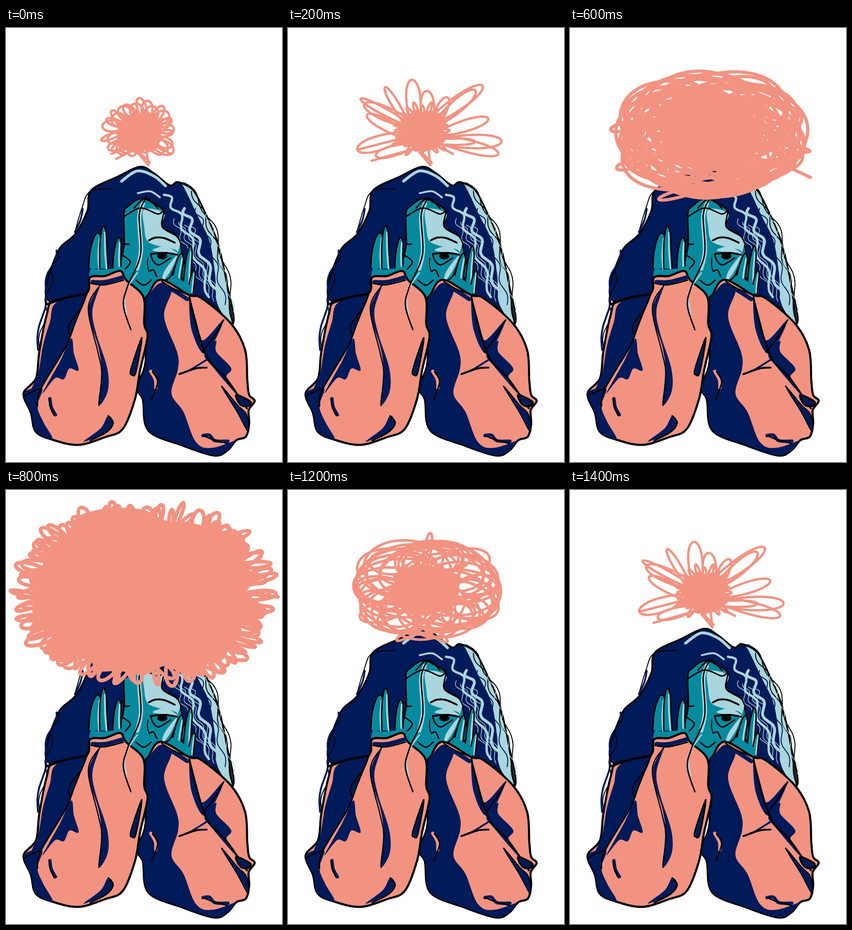
These frames come from a looping animation (597 px wide and 938 px high, 1600 ms). An HTML page:

```html
<!DOCTYPE html>
<html lang="en">
<head>
<meta charset="utf-8">
<title>Tangled thoughts</title>
<style>
html, body { margin: 0; width: 100%; height: 100%; overflow: hidden; background: #fff; }
svg { display: block; width: 100%; height: 100%; }
</style>
</head>
<body>
<svg id="stage" viewBox="0 0 597 938" stroke-linecap="round" stroke-linejoin="round"></svg>
<script>
const NAVY = '#001a5a', TEAL = '#078a9e', PALE = '#a9d6de', CORAL = '#f29382', INK = '#000';
const TAU = Math.PI * 2;
const stage = document.getElementById('stage');

function make(tag, attrs, parent = stage) {
  const node = document.createElementNS('http://www.w3.org/2000/svg', tag);
  for (const key in attrs) node.setAttribute(key, attrs[key]);
  return parent.appendChild(node);
}

function seeded(seed) {
  return () => (seed = seed * 16807 % 2147483647) / 2147483647;
}

const parse = text => text.trim().split(/\s+/).map(p => p.split(',').map(Number));

// Smooth curve through a list of [x, y] points.
function curve(pts, closed) {
  const n = pts.length;
  const at = i => closed ? pts[(i + n) % n] : pts[Math.max(0, Math.min(n - 1, i))];
  let d = 'M' + pts[0];
  for (let i = 0; i < (closed ? n : n - 1); i++) {
    const [a, b, c, e] = [at(i - 1), at(i), at(i + 1), at(i + 2)];
    const p = b.map((v, k) => (v + (c[k] - a[k]) / 6).toFixed(1));
    const q = c.map((v, k) => (v - (e[k] - b[k]) / 6).toFixed(1));
    d += `C${p} ${q} ${c}`;
  }
  return d + (closed ? 'Z' : '');
}

function shape(text, fill, width = 0) {
  make('path', { d: curve(parse(text), true), fill, stroke: INK, 'stroke-width': width });
}
function stroke(pts, color, width) {
  make('path', { d: curve(pts), fill: 'none', stroke: color, 'stroke-width': width });
}
function line(text, color = INK, width = 3) {
  stroke(parse(text), color, width);
}

// Wavy lock of hair along a bend given by start, pull and end.
function lock(text, color, width, amp = 5, turns = 4, phase = 0) {
  const [a, m, b] = parse(text), pts = [], steps = turns * 6;
  const len = Math.hypot(b[0] - a[0], b[1] - a[1]);
  const side = [(a[1] - b[1]) / len, (b[0] - a[0]) / len];
  for (let i = 0; i <= steps; i++) {
    const t = i / steps, sway = amp * Math.sin(t * turns * TAU + phase);
    pts.push([0, 1].map(k =>
      (1 - t) ** 2 * a[k] + 2 * t * (1 - t) * m[k] + t * t * b[k] + side[k] * sway));
  }
  stroke(pts, color, width);
}

// Tapered finger with a pale edge on its right.
function finger(text, width) {
  const [base, tip] = parse(text);
  const u = [tip[0] - base[0], tip[1] - base[1]], len = Math.hypot(...u);
  const at = (t, s) => [base[0] + u[0] * t - u[1] / len * s * width, base[1] + u[1] * t + u[0] / len * s * width];
  const edge = [at(0, -1), at(0.45, -1), at(0.85, -0.6), at(1, 0), at(0.85, 0.6), at(0.45, 0.8), at(0, 1)];
  make('path', { d: curve(edge), fill: TEAL });
  stroke([at(0.85, 0.3), at(0.4, 0.3), at(0, 0.6)], PALE, 3.5);
  stroke(edge, INK, 3);
}

function drawHair() {
  shape(`290,300 240,322 184,351 176,395 150,445 111,486 90,586 200,600 420,590 490,640
    476,545 457,462 430,398 404,350 372,333 354,340 320,314`, NAVY, 4);
  shape('372,334 404,352 430,400 457,464 476,545 490,636 458,598 452,530 440,460 414,405 384,343', PALE);
  line('372,333 404,350 430,398 457,462 476,545 490,638');

  line('250,331 284,309 320,320 345,341', PALE, 6);
  line('285,357 312,353 333,366', PALE, 4);
  lock('345,359 386,410 442,580', PALE, 5, 7, 4, 2.6);
  lock('386,390 410,450 468,600', PALE, 6, 7, 4);
  for (let i = 0; i < 4; i++) {
    lock(`${364 + i * 13},${412 + i * 6} ${388 + i * 10},480 ${430 + i * 12},${565 + i * 12}`, PALE, 1.5, 5, 4, i);
  }
  lock('410,390 442,450 474,598', NAVY, 2, 5, 4);

  line('231,347 182,353 164,390 149,441', INK, 2);
  line('166,391 161,415 149,441', NAVY, 4);
  lock('110,481 84,540 70,696', NAVY, 4, 5, 2, 3);
  lock('112,484 94,540 73,690', INK, 2, 5, 3, 3);

  lock('386,334 478,430 491,637', INK, 2, 6, 3, 3);
  lock('401,353 452,440 478,560', INK, 2, 5, 3);
  lock('434,398 462,480 492,614', PALE, 1.5, 5, 4);
}

function drawFace() {
  shape(`255,402 265,385 296,369 341,395 338,429 370,450 381,490 383,540 300,590 250,530 256,465`, TEAL, 3);
  shape('299,392 342,400 337,430 369,451 377,466 364,504 369,481 326,470 305,459 299,430', PALE);
  shape('370,491 357,523 338,548 343,525', PALE);
  shape('317,480 345,472 371,488 340,485', PALE);
  line('296,380 288,410 292,480 284,520', PALE, 9);
  line('255,408 291,389 328,402 341,397 338,430 369,450 379,468');
  line('277,389 303,367 329,390');
  line('311,375 339,390 342,400');

  line('309,459 323,453 342,454 365,464', INK, 4);
  line('314,488 345,486 370,490', INK, 4);
  make('ellipse', { cx: 338, cy: 493, rx: 11, ry: 7, fill: INK });
  line('313,489 318,503 331,512 356,497');
  line('307,497 306,511 309,524', INK, 2);
  line('310,526 319,523 326,537');
  line('281,545 298,556 314,545');
  line('253,457 258,467 267,467');
  line('250,490 269,505 258,521');
}

function drawHands() {
  finger('193,520 199,443', 14);
  finger('212,520 211,428', 9);
  finger('240,520 244,453', 9);
  shape('184,520 200,522 232,520 250,516 257,532 225,550 184,545', TEAL);

  finger('367,560 380,487', 10);
  finger('391,560 399,471', 8);
  finger('399,572 407,523', 6);
  shape('338,552 359,535 384,548 400,560 394,581 365,575', TEAL);
  line('338,550 355,538 364,518');
}

function drawRightSleeve() {
  shape(`335,544 396,577 423,584 486,638 517,695 522,762 526,793 538,806 525,826 526,855 519,883 498,891
    479,913 450,924 381,902 308,870 296,803 283,777 302,720 300,600 309,575`, CORAL, 4.5);
  shape(`334,551 358,567 342,624 370,700 372,737 358,790 384,830 411,895 448,907 519,882 498,892 479,912
    450,923 381,901 309,869 297,803 284,777 303,720 301,600 311,575`, NAVY);
  line('342,556 364,568 392,586', NAVY, 9);
  line('337,548 364,564 396,577');

  shape('397,582 412,635 426,675 471,630 432,704 402,654', NAVY);
  shape('429,705 454,676 455,700 487,735 477,755 498,791 446,731', NAVY);
  line('397,580 402,605 433,708 476,757 521,822', INK, 4);
  line('471,631 448,670 424,700');
  line('378,747 400,738 434,717', NAVY, 4);
  line('375,748 410,736 434,734', INK, 4);
  shape('466,774 501,815 520,835 524,873 500,830', NAVY, 2);
  shape('498,793 528,807 524,817 507,814', NAVY, 4);
  line('313,742 323,760 324,778', CORAL, 7);
  line('317,743 328,765 315,802');
  line('426,881 440,880 452,892 480,893', NAVY, 7);
  line('427,881 446,889 479,898');
}

function drawLeftSleeve() {
  shape(`182,539 214,536 247,525 260,545 297,581 299,640 306,668 290,740 279,802 253,866 215,884 156,901
    98,889 64,872 54,832 38,790 65,757 72,700 88,620 103,590 173,574`, CORAL, 4.5);
  shape('108,594 172,577 148,638 129,688 75,778 55,783 70,745 80,686 95,635', NAVY);
  shape('39,789 78,779 68,817 80,850 101,889 64,870 55,832', NAVY);
  shape('141,671 147,704 157,740 137,736 125,759 106,757 79,789 117,720', NAVY);
  line('181,560 149,639 130,688 75,781 68,818');
  line('88,597 133,582 174,575', INK, 5);
  line('137,661 137,640 164,604', INK, 2.5);
  line('40,795 57,786 75,779');

  line('187,549 214,549 252,539', NAVY, 9);
  line('184,552 213,555 254,545');
  shape('204,555 180,600 184,640 200,690 207,744 200,815 220,785 219,735 195,660 187,610', NAVY);
  line('204,555 178,605 199,701 207,744 201,816', INK, 2.5);
  shape('294,669 270,738 273,750 281,743', NAVY, 3);
  line('95,801 98,820 107,836', NAVY, 7);
  line('93,801 96,820 104,837');
  shape('221,838 232,853 218,873 168,894 205,865', NAVY);
  line('221,838 232,853 218,873 182,892');
}

function drawLooseStrand() {
  line('284,529 257,573 261,618', PALE, 3);
  line('300,372 288,405 291,490 263,558 254,600 270,652');
}

// Point on a slightly boxy ellipse; k scales the distance from the middle.
function rim(s, angle, k = 1) {
  const bend = v => Math.sign(v) * Math.abs(v) ** (s.box || 1);
  return [s.x + s.rx * k * bend(Math.cos(angle)), s.y + s.ry * k * bend(Math.sin(angle))];
}

// One thin loop that leaves a base point, turns at the tip and returns.
function petal([bx, by], [tx, ty], width) {
  const dx = tx - bx, dy = ty - by, len = Math.hypot(dx, dy) || 1;
  const ctrl = side => [bx + dx * 4 / 3 - side * dy / len * width, by + dy * 4 / 3 + side * dx / len * width];
  return `M${bx} ${by}C${ctrl(1)} ${ctrl(-1)} ${bx} ${by}`;
}

function cloud(s, d) {
  const g = make('g', { fill: 'none', stroke: CORAL, 'stroke-width': s.w, visibility: 'hidden' });
  const rand = seeded(s.seed), blob = [];
  for (let i = 0; i < 36; i++) blob.push(rim(s, i / 36 * TAU, s.core * (0.9 + rand() * 0.2)));
  make('path', { d: curve(blob, true), fill: CORAL }, g);
  make('path', { d: d + (s.extra || '') }, g);
  return g;
}

// Loops that stick out all around a full middle.
function burst(s) {
  const rand = seeded(s.seed + 5);
  let d = '';
  for (let i = 0; i < s.n; i++) {
    const a = (i + rand()) / s.n * TAU;
    const base = rim(s, a + (rand() - 0.5) * s.lean, s.from);
    const tip = rim(s, a, s.near + rand() * (1 - s.near));
    if (s.floor) tip[1] = Math.min(tip[1], s.floor - rand() * 12);
    d += petal(base, tip, s.loop * (0.5 + rand()));
  }
  return cloud(s, d);
}

// Tilted rings, pushed off the middle, that all touch the same rim.
function rings(s) {
  const rand = seeded(s.seed + 5);
  let d = '';
  for (let i = 0; i < s.n; i++) {
    const off = s.off + rand() * 0.4;
    const [cx, cy] = rim(s, i * 2.4, off);
    const rx = s.rx * (1 - off) * (0.85 + rand() * 0.2);
    const ry = s.ry * (1 - off) * (0.55 + rand() * 0.45);
    const tilt = (rand() - 0.5) * 40, r = tilt * Math.PI / 180;
    const ex = rx * Math.cos(r), ey = rx * Math.sin(r);
    const arc = `A${rx} ${ry} ${tilt} 0 1 `;
    d += `M${cx - ex} ${cy - ey}${arc}${cx + ex} ${cy + ey}${arc}${cx - ex} ${cy - ey}`;
  }
  return cloud(s, d);
}

// Long loops thrown to a few tips from a small middle.
function spikes(s) {
  const rand = seeded(s.seed);
  let d = '';
  for (const tip of parse(s.tips)) {
    d += petal([s.x - 18 + rand() * 36, s.y + rand() * 28], tip, 22 + rand() * 34);
  }
  for (let i = 0; i < 24; i++) d += petal([s.x, s.y], rim(s, i / 24 * TAU, 0.78 + rand() * 0.45), 14);
  return cloud(s, d);
}

drawHair();
drawFace();
drawHands();
drawRightSleeve();
drawLeftSleeve();
drawLooseStrand();

const tail = 'M284 268L308 297L304 262M292 272L311 291M325 256L357 272';
const clouds = [
  burst({ x: 290, y: 225, rx: 86, ry: 74, box: 0.9, core: 0.56, from: 0.25, near: 0.78, n: 30, lean: 1.8,
    loop: 34, w: 5, seed: 31, floor: 277, extra: tail + 'M270 258L228 272M280 262L238 283' }),
  spikes({ x: 291, y: 222, rx: 66, ry: 56, core: 0.74, w: 5, seed: 17,
    tips: `421,125 405,135 345,150 300,136 268,112 210,128 157,153 165,165 171,188
      150,263 190,276 433,196 462,245 455,272 405,246`,
    extra: tail + 'M240 240L150 263M270 262L181 287' }),
  rings({ x: 299, y: 214, rx: 161, ry: 112, box: 0.85, core: 0.46, off: 0.3, n: 46, w: 5.5, seed: 77,
    extra: petal([290, 200], [308, 93], 26) + petal([330, 270], [235, 325], 24) + petal([260, 270], [345, 328], 24) }),
  rings({ x: 305, y: 230, rx: 205, ry: 140, box: 0.9, core: 0.52, off: 0.15, n: 60, w: 7, seed: 131,
    extra: petal([180, 200], [88, 220], 30) + petal([190, 280], [101, 303], 30)
      + petal([400, 250], [519, 266], 20) + petal([340, 330], [192, 370], 26) + 'M440 285L520 323' }),
  burst({ x: 298, y: 224, rx: 291, ry: 204, box: 0.88, core: 0.84, from: 0.62, near: 0.89, n: 90, lean: 0.45,
    loop: 30, w: 8, seed: 53, extra: 'M500 222L588 231' })
];
const order = [0, 1, 2, 3, 4, 3, 2, 1];
const start = performance.now();

function render(now) {
  const step = Math.floor(Math.max(0, now - start) % 1600 / 200);
  clouds.forEach((g, i) => g.setAttribute('visibility', i === order[step] ? 'visible' : 'hidden'));
  requestAnimationFrame(render);
}
render(start);
</script>
</body>
</html>
```
